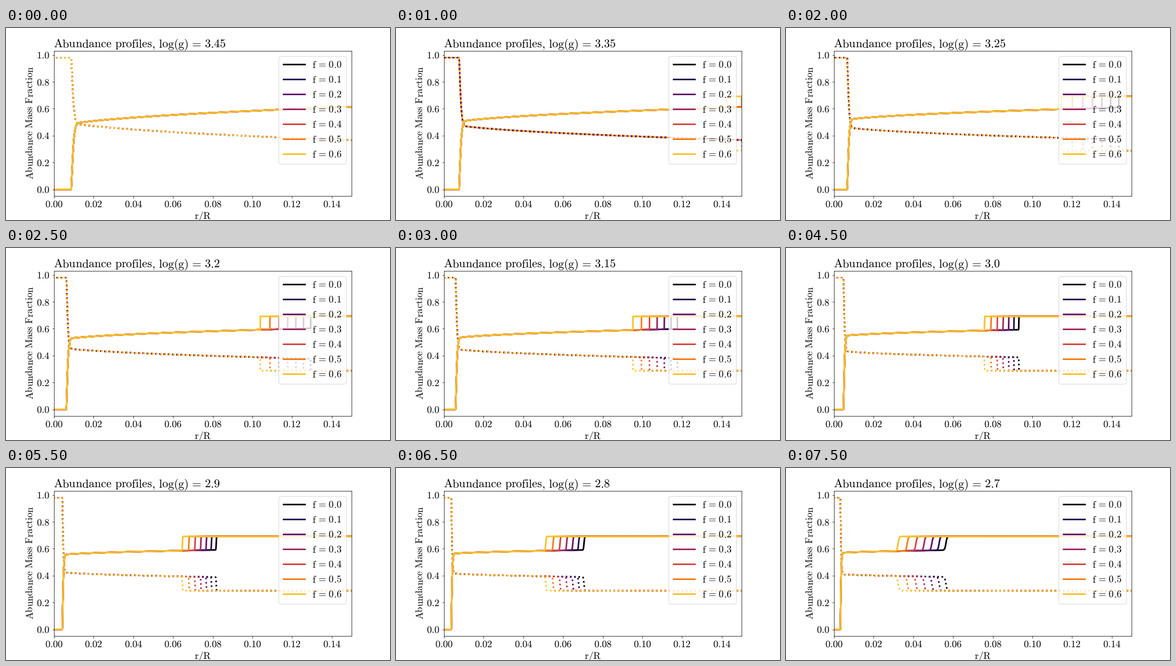
A matplotlib script for the animation above (8 s loop, 720 by 360 pixels).

```python
import numpy as np
import matplotlib.pyplot as plt
from matplotlib.animation import FuncAnimation
from matplotlib.patches import FancyBboxPatch

W, H, DPI = 720, 360, 72
STEPS, INTERVAL, CURVES = 16, 500, 7
TOTAL = 0.98  # the two mass fractions add up to this
LABEL, TITLE = 18.5, 22.1

plt.rcParams["mathtext.fontset"] = "cm"
plt.rcParams["text.hinting"] = "none"

colors = [plt.cm.inferno(k / CURVES) for k in range(CURVES)]
r = np.linspace(0.2, 0, 4001)  # from the surface inwards


def envelope_edge(step, k):
    """Base of the envelope; it sinks with time and with overshoot."""
    d = step - 10
    deepest = 704 - 55 * d - 0.9 * d ** 2 - 0.667 * d ** 3
    n = CURVES - 1 - k
    gap = 33 + 0.62 * (step - 10.2) ** 2
    return (deepest + gap * n * (1 - 0.025 * n)) * 1e-4


def profile(step, k):
    """Rising mass fraction over r for one time step and overshoot index."""
    core = 0.0087 * np.exp(-step / 15)
    slope = 0.43 * np.exp(-step / 11)
    u = np.clip(r - core, 0, None) / (0.115 * core)
    inner = (0.603 - 0.36 * slope + slope * np.sqrt(r)) * (1 - np.exp(-u ** 1.3))
    outer = 0.6935 - 0.0015 * k / (CURVES - 1)
    width = 1e-5 + 6e-4 * (step / 15) ** 5
    mix = 0.5 + 0.5 * np.tanh((r - envelope_edge(step, k)) / width)
    return inner + (outer - inner) * mix


def roman(s):
    gap = r"\hspace{0.133}"
    s = s.replace(", ", "," + gap).replace(" = ", gap + "=" + gap)
    return r"$\mathrm{%s}$" % s.replace(" ", r"\ ")


fig = plt.figure(figsize=(W / DPI, H / DPI), dpi=DPI, facecolor="white")
ax = fig.add_axes([0.125, 0.125, 0.775, 0.755])
ax.set_xlim(0, 0.15)
ax.set_ylim(-0.049, 1.029)
xticks = np.arange(8) * 0.02
yticks = np.arange(6) * 0.2
ax.set_xticks(xticks, [""] * len(xticks))
ax.set_yticks(yticks, [""] * len(yticks))

# Overlay in pixel coordinates for the text and the legend
top = fig.add_axes([0, 0, 1, 1])
top.set_xlim(0, W)
top.set_ylim(H, 0)
top.axis("off")


def label(x, y, s, size=LABEL, ha="center", rotation=0):
    return top.text(x, y, roman(s), size=size, ha=ha, va="baseline",
                    rotation=rotation, rotation_mode="anchor")


for v in xticks:
    label(90 + v * 3720, 336, f"{v:.2f}")
for v in yticks:
    label(82, 308.8 - v * 252.1, f"{v:.1f}", ha="right")
label(369, 358.5, "r/R")
label(51, 178, "Abundance Mass Fraction", rotation=90)
title = label(89.2, 37.2, "", TITLE, "left")

top.add_patch(FancyBboxPatch(
    (511.6, 53.2), 126.6, 202, boxstyle="round,pad=0,rounding_size=4",
    fc="white", ec="0.8", lw=1, alpha=0.8))
for k, c in enumerate(colors):
    y = 68 + 28 * k
    top.plot([519.5, 559.5], [y, y], color=c, lw=3)
    label(574.4, y + 6.8, f"f = {k / 10:.1f}", ha="left")

pairs = [(ax.plot([], [], color=c, lw=3)[0],
          ax.plot([], [], color=c, lw=3, ls=":")[0]) for c in colors]


def update(step):
    title.set_text(roman(
        f"Abundance profiles, log(g) = {round(3.45 - 0.05 * step, 2)}"))
    for k, (solid, dotted) in enumerate(pairs):
        y = profile(step, k)
        solid.set_data(r, y)
        dotted.set_data(r, TOTAL - y)


anim = FuncAnimation(fig, update, frames=STEPS, interval=INTERVAL,
                     init_func=lambda: update(0), repeat=True, repeat_delay=0)
plt.show()
```
